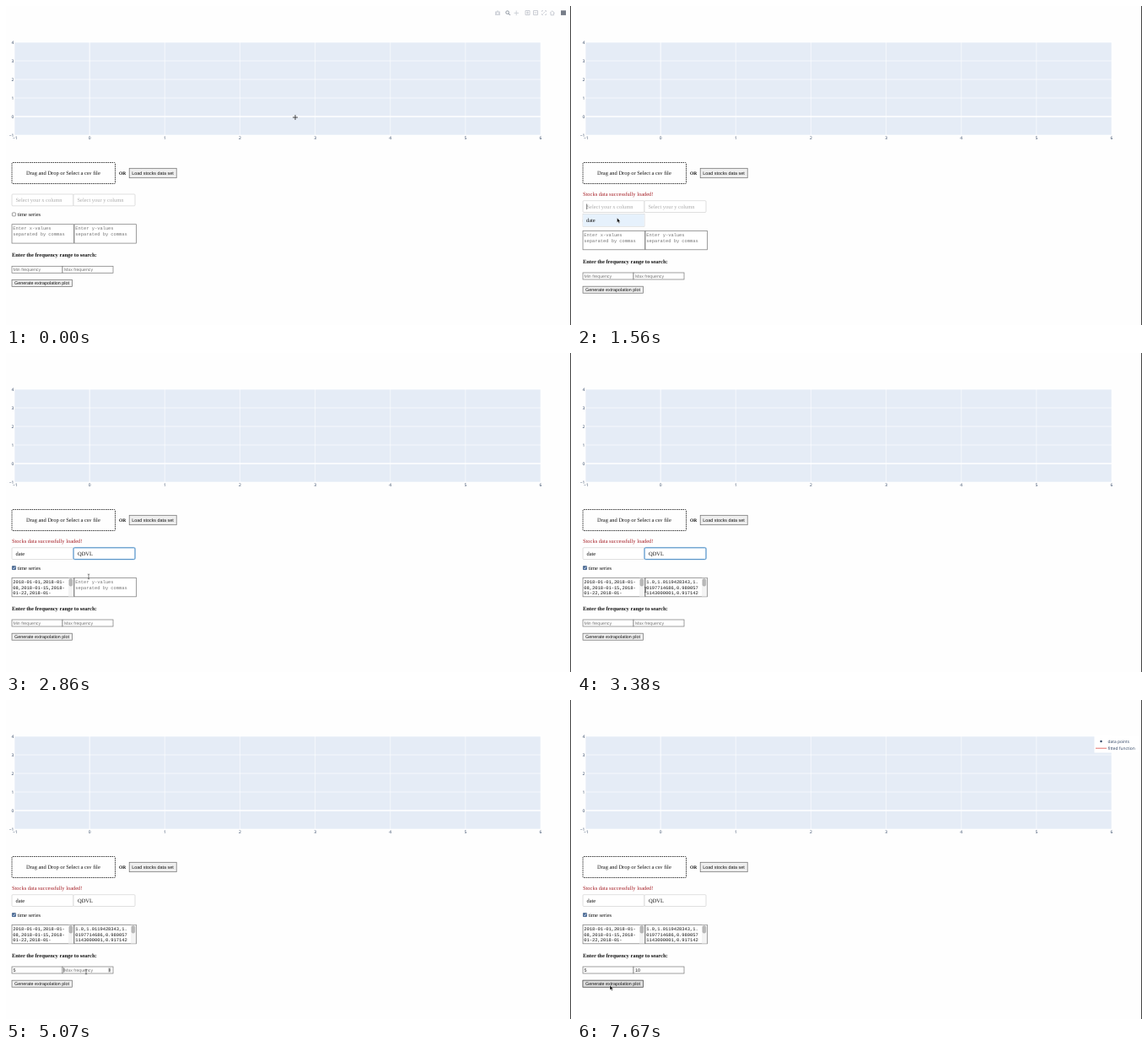
Animation of 670 by 378 pixels, one loop 8 s. Source, as an HTML page:

```html
<!DOCTYPE html>
<html lang="en">
<head>
<meta charset="utf-8">
<title>Extrapolation form</title>
<style>
  html, body { margin: 0; width: 100%; height: 100%; overflow: hidden; background: #fefefe; }
  svg { display: block; width: 670px; height: 378px; }
  text { font: 6.45px "Liberation Serif", serif; fill: #111; white-space: pre; text-rendering: geometricPrecision; }
  .bold { font-weight: bold; }
  .ui { font: 5.4px "Liberation Sans", sans-serif; }
  .mono { font: 5.4px "Liberation Mono", monospace; }
  .tick { font: 4.9px "Open Sans", sans-serif; fill: #2a3f5f; }
  .mid { text-anchor: middle; }
  .end { text-anchor: end; }
  .hint { fill: #aaa; }
  .dim { fill: #757575; }
  .select { fill: #fff; stroke: #ccc; stroke-width: .6; }
  .field { fill: #fff; stroke: #767676; stroke-width: .7; }
  .button { fill: #efefef; stroke: #6b6b6b; stroke-width: .7; }
  .hover { fill: #dedede; stroke: #555; stroke-width: .7; }
  .caret { stroke: #222; stroke-width: .6; }
  .thumb { fill: #b9b9b9; stroke: #999; stroke-width: .3; }
  .pick { fill: #e6f1fc; }
</style>
</head>
<body>
<svg viewBox="0 0 670 378">
  <rect width="670" height="378" fill="#fefefe"/>
  <rect x="669" width="1" height="378" fill="#444"/>

  <rect x="10" y="43" width="624" height="110" fill="#e5ecf6"/>
  <g id="axes" stroke="#fff"></g>

  <g data-on="0,260" fill="none" stroke="#c4c8d0" stroke-width="1">
    <path d="M580 6.5h1.5l.6-1h1.8l.6 1h1.5v4.5h-6z" fill="#d3d6dc" stroke="none"/>
    <circle cx="583" cy="8.6" r="1.1" fill="#fff" stroke="none"/>
    <g stroke="#8d949f"><circle cx="594.6" cy="7.6" r="1.8"/><path d="M596 9l2 2"/></g>
    <path d="M602.5 8.3h5.5M605.2 5.5v5.6" stroke-width=".8"/>
    <path d="M616 5.5h5v5h-5zM617 8h3M618.5 6.5v3M625.5 5.5h5v5h-5zM626.5 8h3" stroke-width=".9"/>
    <path d="M635.5 7v-1.5h1.5M639 5.5h1.5V7M640.5 9v1.5H639M637 10.5h-1.5V9M636.7 9.3l2.6-2.6" stroke-width=".7"/>
    <path d="M645 8.3l2.8-2.5 2.8 2.5M646 8v2.8h3.6V8" stroke-width=".9"/>
    <rect x="658" y="5.3" width="6" height="5.6" fill="#777d88" stroke="none"/>
  </g>

  <g data-on="7670,8000">
    <rect x="613.5" y="43" width="52" height="19.5" fill="#fff"/>
    <circle cx="621.5" cy="49" r="1.2" fill="#2a3f5f"/>
    <path d="M615 57.2h13" stroke="#e0605a" stroke-width=".9"/>
    <text class="tick" x="629.5" y="50.8">data points</text>
    <text class="tick" x="629.5" y="59">fitted function</text>
  </g>

  <rect x="7" y="185.5" width="122.5" height="25" rx="1" fill="none" stroke="#111" stroke-width=".8" stroke-dasharray="1.6 .9"/>
  <text x="24" y="200.2">Drag and Drop or Select a csv file</text>
  <text class="bold" x="134" y="200.1" style="font-size:5.5px">OR</text>
  <rect class="button" x="146.2" y="192.3" width="56" height="11.4"/>
  <rect class="hover" data-on="520,1040" x="146.2" y="192.3" width="56" height="11.4"/>
  <text class="ui" x="149.3" y="200">Load stocks data set</text>
  <text data-on="650,8000" x="7" y="224.6" style="fill:#a51d24">Stocks data successfully loaded!</text>

  <g id="form">
    <rect class="select" x="7" y="230.7" width="73" height="13.8" rx="1"/>
    <rect class="select" x="80" y="230.7" width="73" height="13.8" rx="1"/>
    <g data-on="2340,3900" fill="none">
      <rect x="80" y="230.7" width="73" height="13.8" rx="1.4" stroke="#cfe3f5" stroke-width="2"/>
      <rect x="80" y="230.7" width="73" height="13.8" rx="1.4" stroke="#3f83bd" stroke-width=".8"/>
    </g>
    <text class="hint" data-on="0,1690" x="11.5" y="240">Select your x column</text>
    <text data-on="1690,8000" x="11.5" y="240">date</text>
    <text class="hint" data-on="0,2730" x="84.5" y="240">Select your y column</text>
    <text data-on="2730,8000" x="85" y="240">QDVL</text>
    <path class="caret" data-on="1300,1690" d="M11.6 234.5v6.6"/>
    <path class="caret" data-on="2340,2730" d="M84.6 234.5v6.6"/>

    <rect class="field" x="7.4" y="252.6" width="4" height="4" rx=".6"/>
    <g data-on="650,8000">
      <rect x="7" y="252.2" width="4.8" height="4.8" rx=".8" fill="#4b6c98"/>
      <path d="M8.1 254.7l1 1.1 1.7-2.5" fill="none" stroke="#fff" stroke-width=".7"/>
    </g>
    <text x="13.4" y="257">time series</text>

    <rect class="field" x="7" y="266.4" width="73.4" height="22.4"/>
    <rect class="field" x="81" y="266.4" width="73.4" height="22.4"/>
    <g id="areas"></g>

    <text class="bold" x="7" y="305.2">Enter the frequency range to search:</text>

    <rect class="field" x="7" y="316" width="60" height="8"/>
    <rect class="field" x="67" y="316" width="60" height="8"/>
    <text class="ui dim" data-on="0,4290" x="8.4" y="321.9" style="font-size:5.2px">Min frequency</text>
    <text class="ui" data-on="4290,8000" x="8.4" y="321.9">5</text>
    <text class="ui dim" data-on="0,5330" x="69" y="321.9" style="font-size:5.2px">Max frequency</text>
    <text class="ui" data-on="5330,5590" x="69" y="321.9">1</text>
    <text class="ui" data-on="5590,8000" x="69" y="321.9">10</text>
    <path class="caret" data-on="3900,4290" d="M8.4 317.3v5.4"/>
    <path class="caret" data-on="4940,5330" d="M68.6 317.3v5.4"/>
    <g data-on="3900,4680"><use href="#spin" x="62.3" y="320"/></g>
    <g data-on="4810,5850"><use href="#spin" x="122.8" y="320"/></g>

    <rect class="button" x="7" y="332.2" width="71.5" height="8"/>
    <rect class="hover" data-on="6110,8000" x="7" y="332.2" width="71.5" height="8"/>
    <text class="ui" x="10" y="338.1">Generate extrapolation plot</text>

    <g data-on="1300,1690">
      <rect class="select" x="7" y="246.4" width="73" height="14.8"/>
      <rect class="pick" x="7.3" y="246.7" width="72.4" height="14.2"/>
      <text x="11" y="256">date</text>
    </g>
    <g data-on="2340,2730" id="menu"></g>
  </g>

  <defs>
    <g id="spin"><rect x="-1.8" y="-3" width="3.6" height="6" rx=".8" fill="#ddd"/><path d="M-1-.5L0-2 1-.5zM-1 .5L0 2 1 .5z" fill="#222"/></g>
  </defs>
  <g id="cursor">
    <path data-on="0,260" d="M-3 0h6M0-3v6" stroke="#222" stroke-width=".8"/>
    <path data-on="260,2730" d="M0 0v5.6l1.3-1.1 1 2 .9-.4-.9-1.9h1.6z" stroke="#fff" stroke-width=".4"/>
    <path data-on="2730,5980" d="M-1.2-3Q0-3 0-2.3Q0-3 1.2-3M0-2.3V2.3M-1.2 3Q0 3 0 2.3Q0 3 1.2 3" fill="none" stroke="#333" stroke-width=".6"/>
    <path data-on="5980,8000" d="M0 0v5.6l1.3-1.1 1 2 .9-.4-.9-1.9h1.6z" stroke="#fff" stroke-width=".4"/>
  </g>
</svg>
<script>
const LOOP = 8000, STEP = 130, LOADED = 650;
const $ = id => document.getElementById(id);
const label = (x, y, cls, s) => `<text class="${cls}" x="${x}" y="${y}">${s}</text>`;

// Grid and tick labels
let axes = '';
for (let i = 0; i < 8; i++) {
  const x = 10 + i * 624 / 7, s = String(i - 1).replace('-', '−');
  axes += `<path d="M${x} 43v110" stroke-width="${i === 1 ? .9 : .6}"/>`;
  axes += `<g stroke="none">${label(x + (i ? 0 : .8), 158, 'tick mid', s)}</g>`;
  if (i > 5) continue;
  const y = 153 - i * 22;
  axes += `<path d="M10 ${y}h624" stroke-width="${i === 1 ? 1.3 : .6}"/>`;
  axes += `<g stroke="none">${label(9.4, y + 1.9, 'tick end', s)}</g>`;
}
$('axes').innerHTML = axes;

// Text areas: hint first, values once a column is chosen
const lines = (x, cls, rows) => rows.map((s, i) => label(x, 273.1 + i * 6.4, cls, s)).join('');
const area = (x, name, filled, rows) =>
  `<g data-on="0,${filled}">${lines(x + 1.3, 'mono dim', [`Enter ${name}-values`, 'separated by commas'])}</g>
   <g data-on="${filled},${LOOP}">${lines(x + 1.3, 'mono', rows)}
   <rect x="${x + 67}" y="266.8" width="6" height="21.6" fill="#f4f4f4"/>
   <rect class="thumb" x="${x + 67.8}" y="267.6" width="4" height="8.6" rx="1.8"/></g>`;
$('areas').innerHTML =
  area(7, 'x', 1820, ['2018-01-01,2018-01-', '08,2018-01-15,2018-', '01-22,2018-01-']) +
  area(81, 'y', 2990, ['1.0,1.0119428343,1.', '0197714686,0.980057', '1143000001,0.917142']);

$('menu').innerHTML = '<rect class="select" x="80" y="246.4" width="73" height="70.6"/>' +
  '<rect class="pick" x="80.3" y="260.7" width="72.4" height="14"/>' +
  ['TUWB', 'QDVL', 'KRYO', 'ZEHN', 'VOQS'].map((s, i) => label(84.5, 256 + i * 14, '', s)).join('');

// Pointer path: time, x, y
const path = [
  [0, 343, 132], [130, 325, 139], [520, 192, 197], [780, 190, 196], [910, 188, 198],
  [1300, 47, 238], [1560, 47.5, 251], [2080, 48, 251], [2340, 98, 238], [2600, 98, 265],
  [2860, 98, 265], [3250, 90, 274], [3770, 34, 316], [4290, 34, 316], [4420, 36, 318],
  [4940, 95, 322], [5590, 95, 322], [5980, 48, 344], [6240, 39, 338], [LOOP, 39, 338]
];
function pointer(t) {
  const i = path.findIndex(p => p[0] > t);
  const [t0, x0, y0] = path[i - 1], [t1, x1, y1] = path[i];
  const k = (t - t0) / (t1 - t0), e = k * k * (3 - 2 * k);
  return [x0 + (x1 - x0) * e, y0 + (y1 - y0) * e];
}

const timed = [...document.querySelectorAll('[data-on]')]
  .map(el => [el, ...el.dataset.on.split(',').map(Number)]);

function draw(now) {
  const t = Math.floor(now % LOOP / STEP) * STEP;
  for (const [el, from, to] of timed) el.style.display = t >= from && t < to ? '' : 'none';
  $('form').setAttribute('transform', `translate(0 ${t < LOADED ? -7.7 : 0})`);
  $('cursor').setAttribute('transform', `translate(${pointer(t)})`);
}
const start = performance.now();
function tick() {
  draw(performance.now() - start);
  requestAnimationFrame(tick);
}
tick();
</script>
</body>
</html>
```
